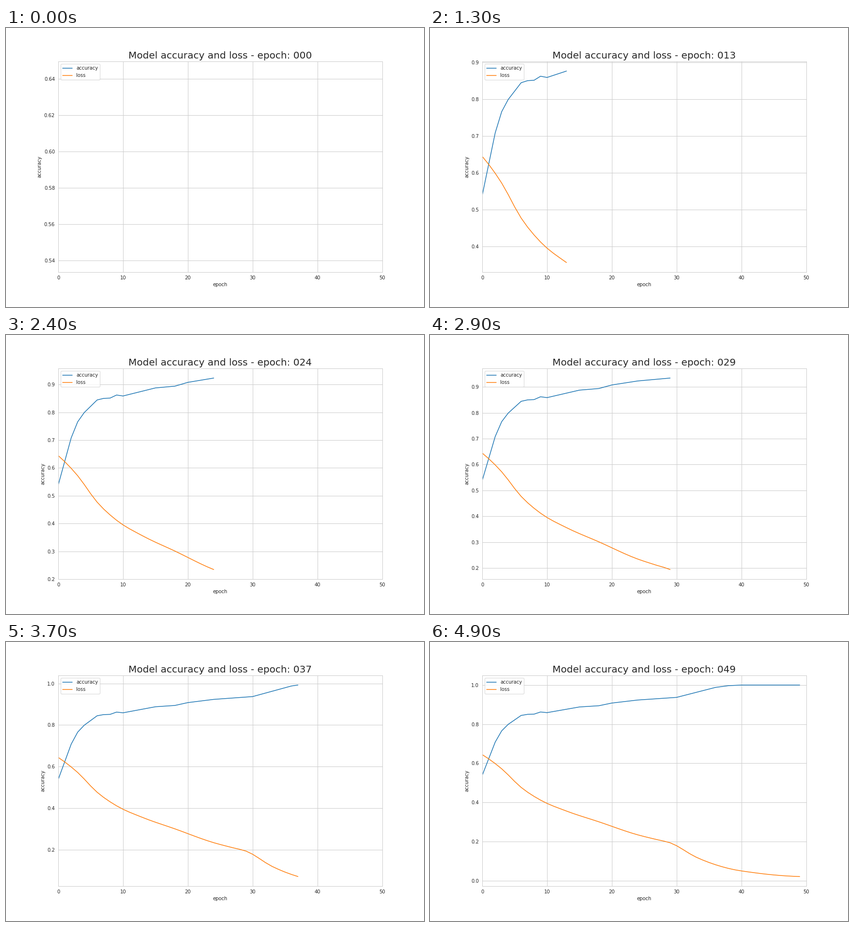
Write a matplotlib script that moves like this. It is 864x576 px and loops after 5000 ms.

```python
import matplotlib.pyplot as plt
import numpy as np
from matplotlib.animation import FuncAnimation

EPOCHS = 50
INTERVAL = 100  # ms per epoch

plt.rcParams.update({
    "font.family": "DejaVu Sans",
    "font.size": 10,
    "text.color": ".15",
    "axes.labelcolor": ".15",
    "axes.edgecolor": ".8",
    "axes.linewidth": 1,
    "axes.axisbelow": True,
    "axes.grid": True,
    "grid.color": ".8",
    "grid.linewidth": 1,
    "lines.linewidth": 1.5,
    "lines.solid_capstyle": "round",
    "xtick.color": ".15",
    "ytick.color": ".15",
    "xtick.major.size": 0,
    "ytick.major.size": 0,
    "xtick.major.pad": 7,
    "ytick.major.pad": 7,
})

# Turning points of each curve as (epoch, value).
ACCURACY_KEYS = [(0, .5389), (2, .7085), (3, .766), (4, .799), (6, .8447),
                 (7, .8503), (8, .8514), (9, .8624), (10, .859), (15, .888),
                 (18, .8943), (20, .908), (24, .9235), (30, .937),
                 (36, .988), (38, .9968), (40, 1)]
LOSS_KEYS = [(0, .6443), (3, .572), (6, .477), (9, .4118), (13, .356),
             (18, .301), (24, .2344), (27, .2097), (29, .1938),
             (33, .1205), (38, .0628), (42, .0408), (49, .0212)]


def smooth_curve(x, keys):
    """Cubic Hermite curve through the key points."""
    kx, ky = np.array(keys).T
    slope = np.gradient(ky, kx, edge_order=2)
    i = np.clip(np.searchsorted(kx, x, side="right") - 1, 0, len(kx) - 2)
    width = kx[i + 1] - kx[i]
    t = (x - kx[i]) / width
    blend = t * t * (3 - 2 * t)
    return (ky[i] + (ky[i + 1] - ky[i]) * blend
            + width * t * (1 - t) * (slope[i] * (1 - t) - slope[i + 1] * t))


epochs = np.arange(EPOCHS)
accuracy = np.interp(epochs, *zip(*ACCURACY_KEYS))
loss = smooth_curve(epochs, LOSS_KEYS)

fig, ax = plt.subplots(figsize=(12, 8), dpi=72, facecolor="white")
fig.subplots_adjust(left=.125, right=.9, bottom=.125, top=.88)

accuracy_line, = ax.plot([], [], color="#1f77b4", label="accuracy")
loss_line, = ax.plot([], [], color="#ff7f0e", label="loss")
ax.set_xlim(0, EPOCHS)
ax.set_xlabel("epoch")
ax.set_ylabel("accuracy")
ax.legend(loc="upper left")
title = ax.set_title("", fontsize=20)


def update(epoch):
    shown = slice(0, epoch + 1)
    accuracy_line.set_data(epochs[shown], accuracy[shown])
    loss_line.set_data(epochs[shown], loss[shown])

    values = np.concatenate([accuracy[shown], loss[shown]])
    margin = 0.05 * np.ptp(values)
    ax.set_ylim(values.min() - margin, values.max() + margin)
    title.set_text(f"Model accuracy and loss - epoch: {epoch:03d}")
    return accuracy_line, loss_line, title


anim = FuncAnimation(fig, update, frames=EPOCHS, interval=INTERVAL,
                     repeat=True, repeat_delay=0, blit=False)
plt.show()
```
